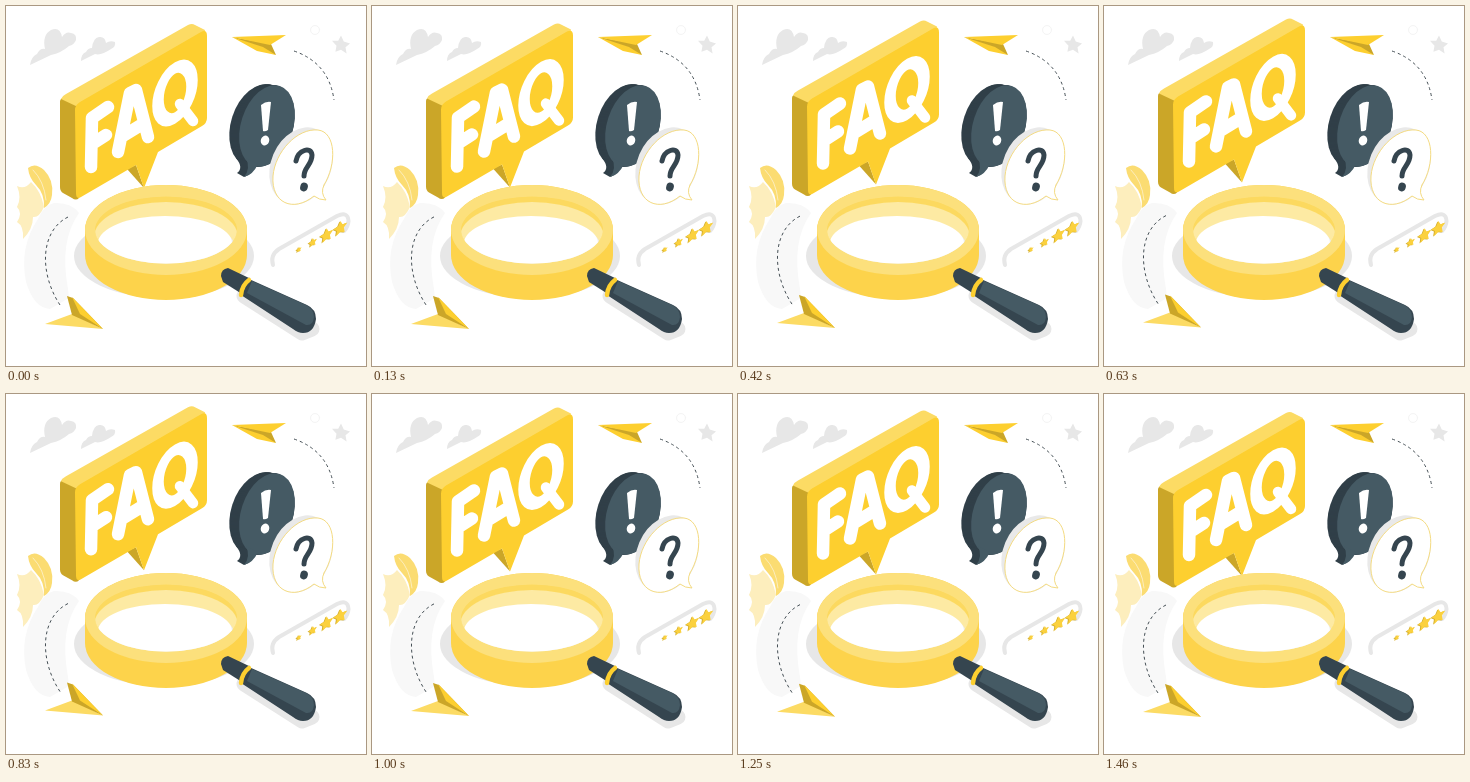
Animation, 360 px wide and 360 px high, one loop 1.5 s. Source, as an HTML page with a canvas:

```html
<!DOCTYPE html>
<html lang="en">
<head>
<meta charset="utf-8">
<title>FAQ</title>
<style>
html, body { margin: 0; width: 100%; height: 100%; overflow: hidden; background: #fff; }
canvas { display: block; width: 360px; height: 360px; }
</style>
</head>
<body>
<canvas id="stage" width="360" height="360"></canvas>
<script>
const ctx = document.getElementById('stage').getContext('2d');
const LOOP = 1500, STEPS = 36;
const YELLOW = '#fdcf2f', LIGHT = '#fcdb64', OCHRE = '#cba628';
const SLATE = '#455a64', NAVY = '#35454f', GREY = '#e7e7e7';

function fill(color, d) {
  ctx.fillStyle = color;
  ctx.fill(new Path2D(d));
}

function line(color, width, d, dash = []) {
  ctx.strokeStyle = color;
  ctx.lineWidth = width;
  ctx.lineCap = dash.length ? 'butt' : 'round';
  ctx.lineJoin = 'round';
  ctx.setLineDash(dash);
  ctx.stroke(new Path2D(d));
  ctx.setLineDash([]);
}

function oval(color, x, y, rx, ry, angle = 0) {
  ctx.beginPath();
  ctx.ellipse(x, y, rx, ry, angle, 0, Math.PI * 2);
  ctx.fillStyle = color;
  ctx.fill();
}

// Runs a drawing at (x, y) with its horizontals sheared by slant.
function placed(x, y, slant, draw) {
  ctx.save();
  ctx.transform(1, slant, 0, 1, x, y);
  draw();
  ctx.restore();
}

function star(color, x, y, r, slant) {
  placed(x, y, slant, () => {
    ctx.beginPath();
    for (let i = 0; i < 10; i++) {
      const a = -Math.PI / 2 + i * Math.PI / 5, s = i % 2 ? r * 0.5 : r;
      ctx.lineTo(Math.cos(a) * s, Math.sin(a) * s);
    }
    ctx.fillStyle = color;
    ctx.fill();
  });
}

function sky() {
  fill(GREY, 'M24 59 Q25 51 31 48 Q34 42 39 43 Q36 29 45 24 Q54 20 56 31 Q60 25 65 27 Q71 28 70 34 Q68 39 63 40 Q55 47 45 49 Z');
  fill(GREY, 'M75 55 Q75 48 80 46 Q82 42 86 42 Q87 32 93 31 Q99 30 100 37 Q104 34 109 36 Q110 41 105 43 Q95 50 89 48 Z');
  star(GREY, 335, 39, 9.5, 0.15);
  ctx.beginPath();
  ctx.arc(309, 24, 4.5, 0, Math.PI * 2);
  ctx.strokeStyle = '#f4f4f4';
  ctx.lineWidth = 1;
  ctx.stroke();
}

function leaves() {
  fill('#f8f8f8', 'M48 197 Q65 196 73 207 Q53 235 62 283 L63 292 L44 303 Q28 302 20 276 Q13 241 32 213 Q38 199 48 197 Z');
  fill('#fdeebd', 'M11 180 Q19 184 25 176 Q35 185 38 201 Q33 212 27 211 Q27 223 17 233 Q18 220 11 216 Q17 207 11 201 Q16 192 11 180 Z');
  fill('#fbdc72', 'M22 162 Q29 156 38 164 Q48 174 46 189 Q45 198 38 202 Q39 188 30 179 Q23 172 22 162 Z');
  line('#fdeebd', 1, 'M27 164 Q38 175 40 194');
}

function upperPlane() {
  line('#454f55', 1, 'M288 45 Q323 57 328 94', [3, 3]);
  fill(OCHRE, 'M226 31 L265 38 L270 49 Z');
  fill(YELLOW, 'M226 31 L257 41 L270 49 L251 45 Z');
  fill(YELLOW, 'M226 31 L280 29 L264 39 Z');
}

function lowerPlane() {
  line('#454f55', 1, 'M62 211 C34 225 33 267 54 299', [3, 3]);
  fill(LIGHT, 'M39 318 L66 308 L97 323 Z');
  fill(OCHRE, 'M61 290 L67 292 L97 323 L66 309 Z');
  fill(YELLOW, 'M66 291 L97 323 L74 308 Z');
}

function board() {
  fill(OCHRE, 'M54 96 Q54 91 59 93 L70 99 L73 192 Q70 195 66 192 L57 187 Q54 185 54 181 Z');
  fill(LIGHT, 'M55 93 Q56 90 60 88 L182 19 Q186 17 189 19 L199 24 L198 30 L72 101 Z');
  fill(OCHRE, 'M121 163 L130 159 L138 182 Z');
  fill(YELLOW, 'M69 104 Q69 99 74 96 L195 26 Q201 23 201 30 L201 112 Q201 117 196 120 L152 146 L138 182 L130 159 L75 191 Q70 194 70 187 Z');
  line('#fff', 12.5, 'M86 112 L85 161 M86 112 L102 101 M86 138 L100 129');
  line('#fff', 12.5, 'M112 146 L124 87 L130 84 L142 131 M117 130 L135 119');
  placed(169, 87, -0.57, () => {
    ctx.beginPath();
    ctx.ellipse(0, 0, 17, 25, 0, 0, Math.PI * 2);
    ctx.lineWidth = 11.5;
    ctx.stroke();
  });
  line('#fff', 10.5, 'M174 98 L187 115');
}

function darkBubble() {
  for (let i = 0; i <= 8; i++) oval('#303f48', 252 + i, 119 + i / 8, 27, 42, 0.31);
  fill('#303f48', 'M230 152 L250 158 Q246 169 238 171 L231 167 Q238 162 230 152 Z');
  oval(SLATE, 261, 120, 26, 42, 0.31);
  fill(SLATE, 'M240 152 L252 158 Q247 169 238 171 Q245 163 240 152 Z');
  fill('#fff', 'M255 99 Q260 95 265 96 L262 124 Q259 126 257 125 Z');
  oval('#fff', 259, 134.5, 4.2, 5, 0.35);
}

function whiteBubble() {
  const outline = 'M318 179 Q314 187 320 194 Q313 194 308 190 C287 207 265 197 267 170 C269 146 291 122 312 124 C330 126 331 158 318 179';
  oval('#e9e9e9', 295, 160, 30, 40, 0.4);
  fill('#fff', outline);
  line('#f4db82', 1, outline);
  line(NAVY, 5, 'M290 155 C292 144 305 140 306 149 C306 159 298 161 298 170');
  oval(NAVY, 298, 181, 3.8, 4.4, 0.3);
}

function rating() {
  line(GREY, 4, 'M267 259 Q264 249 273 243 L331 210 Q342 205 342.5 215 Q342 221 338 225');
  [2.8, 4.5, 7, 7.3].forEach((r, i) => {
    const x = 293 + i * 13.8, y = 243.5 - i * 7.1;
    star('#d2ad2d', x - 1, y + 0.5, r, -0.5);
    star('#fbd13e', x, y, r, -0.5);
  });
}

function magnifier() {
  oval(GREY, 158, 250, 90, 42);
  line(GREY, 15, 'M238 290 L296 327 L306 323');

  fill('#fdd34b', 'M79 224 A81 45 0 0 1 241 224 L241 249 A81 45 0 0 1 79 249 Z');
  oval('#fce07c', 160, 224, 81, 45);

  ctx.save();
  ctx.beginPath();
  ctx.ellipse(160, 224, 71, 33.5, 0, 0, Math.PI * 2);
  ctx.clip();
  oval('#fcd95f', 160, 224, 72, 35);
  oval('#fdeaa3', 160, 231, 72, 35);
  oval('#ededed', 160, 242, 69, 31);
  oval('#fff', 159, 237, 67, 27);
  ctx.restore();

  fill(NAVY, 'M215 270 Q215 263 222 262 L243 272 L236 288 L217 276 Z');
  fill(NAVY, 'M243 273 L301 299 Q310 303 310 313 Q308 327 297 327 Q292 327 287 323 L235 289 Z');
  fill(SLATE, 'M246 275 L300 299 Q308 303 308 311 Q307 320 300 319 L241 287 Z');
  line(YELLOW, 4.5, 'M243 274 Q236 279 235 289');
}

function draw(time) {
  // The small offset absorbs clock rounding at step boundaries.
  const step = Math.floor((time % LOOP) / LOOP * STEPS + 0.1);
  const wave = Math.sin(Math.PI * step / STEPS) ** 2;
  ctx.fillStyle = '#fff';
  ctx.fillRect(0, 0, 360, 360);
  sky();
  leaves();
  upperPlane();
  placed(0, -1.5 * wave, 0, lowerPlane);
  darkBubble();
  whiteBubble();
  rating();
  placed(0, -6 * wave, 0, board);
  magnifier();
}

let start;
function tick(now) {
  start ??= now;
  draw(now - start);
  requestAnimationFrame(tick);
}
draw(0);
requestAnimationFrame(tick);
</script>
</body>
</html>
```
